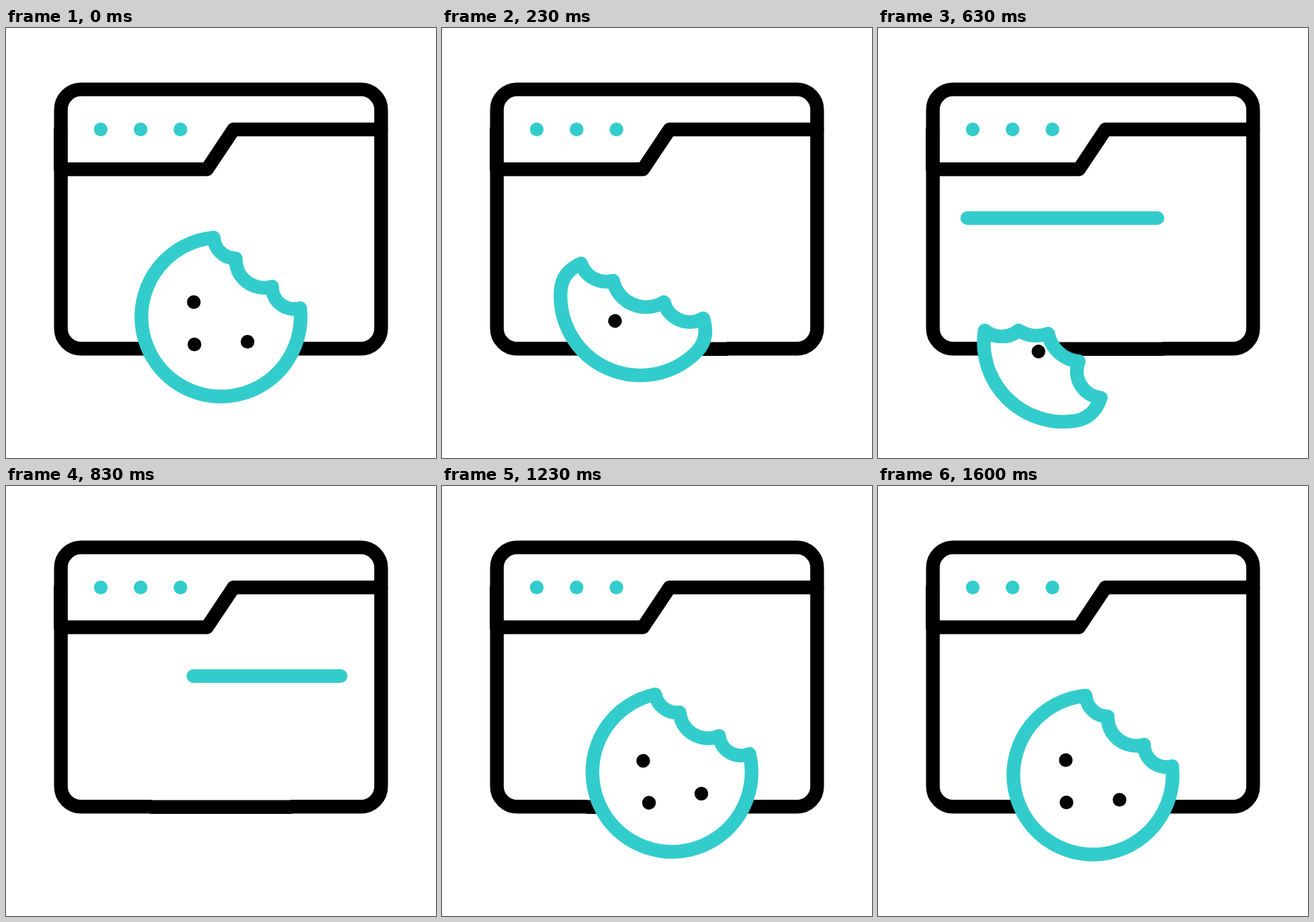
An HTML page for the animation above (1670 ms loop, 640 px wide and 640 px high).

```html
<!DOCTYPE html>
<html lang="en">
<head>
<meta charset="utf-8">
<title>Cookie</title>
<style>
  html, body { margin: 0; width: 100%; height: 100%; overflow: hidden; background: #fff; }
  svg { display: block; width: 100vw; height: 100vh; }
  .line { fill: none; stroke: #000; stroke-width: 20.4; stroke-linecap: round; stroke-linejoin: round; }
  .teal { stroke: #3cc; }
  .tealFill { fill: #3cc; }
</style>
</head>
<body>
<svg viewBox="0 0 640 640">
  <defs>
    <clipPath id="inside"><path id="clip"/></clipPath>
    <circle id="dot" r="10.2"/>
  </defs>
  <path class="line" d="M215.5 477.2H111.7a30 30 0 0 1-30-30V121.4a30 30 0 0 1 30-30H528.3a30 30 0 0 1 30 30V447.2a30 30 0 0 1-30 30H425M215.5 477.7H425"/>
  <path class="line" d="M558.3 151H338.7L299.2 210.2H81.3V151"/>
  <g class="tealFill">
    <use href="#dot" x="141" y="151"/>
    <use href="#dot" x="200.3" y="151"/>
    <use href="#dot" x="259.6" y="151"/>
  </g>
  <path id="bar" class="line teal"/>
  <g id="cookie">
    <path id="dough" fill="#fff"/>
    <g clip-path="url(#inside)">
      <g id="chips">
        <use href="#dot" x="-40.5" y="-22"/>
        <use href="#dot" x="-39.5" y="41"/>
        <use href="#dot" x="39.5" y="37"/>
      </g>
    </g>
    <path id="rim" class="line teal"/>
  </g>
</svg>
<script>
const LOOP = 1670, STEP = 1000 / 30, LAST = 48, R = 118.5;
const el = id => document.getElementById(id);
const ramp = (n, a, b) => Math.min(1, Math.max(0, (n - a) / (b - a)));
const ease = (n, a, b) => { const u = ramp(n, a, b); return u * u * (3 - 2 * u); };
const mix = (p, q, u) => p.map((v, i) => v + (q[i] - v) * u);

// Tooth marks from the upper end of the rim to the right end
const corners = [[-10.9, -118], [22, -87], [28.1, -63.2], [76, -45], [117.8, -13]];
const radii = [33, 43, 43, 33];
const leftBite = [[-115.3, 26.4], [-68.5, 8.2]];

// An end of the bite that lies inside the circle is joined to the rim by a rounded corner.
function rimEnd([x, y], side) {
  const depth = Math.max(0, R - Math.hypot(x, y));
  const a = Math.atan2(y, x) + side * depth * 0.024;
  const px = R * Math.cos(a), py = R * Math.sin(a), len = side * depth * 1.55;
  return { a, at: `${px} ${py}`, bend: `${px + Math.sin(a) * len} ${py - Math.cos(a) * len}` };
}

function outline(deep, left) {
  const grow = 1 + 0.2 * deep;
  const pts = corners.map(([x, y], i) => {
    const p = [x * grow - 59.5 * deep, y * grow + 72.4 * deep];
    return leftBite[i] ? mix(p, leftBite[i], left) : p;
  });
  const start = rimEnd(pts[4], 1), end = rimEnd(pts[0], -1);
  const turn = (end.a - start.a + 4 * Math.PI) % (2 * Math.PI);
  const teeth = radii.map((r, i) => `A${r * grow} ${r * grow} 0 0 0 ${pts[i + 1]}`).join('');
  return `M${pts[0]}${teeth}Q${start.bend} ${start.at}` +
    `A${R} ${R} 0 ${turn > Math.PI ? 1 : 0} 1 ${end.at}Q${end.bend} ${pts[0]}Z`;
}

// Hop up, fall and shrink away while being eaten
function leaving(n) {
  const rise = ease(n, 0, 11), fall = ease(n, 11, 20);
  return {
    x: 320 - 35.8 * rise - 8.5 * fall,
    y: 430 - 45 * rise + 85.5 * fall,
    tilt: -21.5 * rise + 44.4 * fall,
    size: 1 - ease(n, 20, 24),
    deep: ease(n, 2, 6),
    left: ease(n, 9, 13)
  };
}

// Pop in, drop below the resting place and settle
function arriving(n) {
  const grow = ease(n, 28, 34), drop = ease(n, 34, 40.5), settle = ease(n, 40.5, 48);
  return {
    x: 363.2 - 47.2 * drop + 4 * settle,
    y: 394.4 + 71.3 * drop - 35.7 * settle,
    tilt: -30 + 17.5 * grow + 12.5 * drop,
    size: grow,
    deep: 0,
    left: 0
  };
}

function drawCookie(n) {
  const c = n < 26 ? leaving(n) : arriving(n);
  const d = outline(c.deep, c.left);
  el('cookie').style.display = c.size > 0 ? '' : 'none';
  el('cookie').setAttribute('transform', `translate(${c.x} ${c.y}) rotate(${c.tilt}) scale(${c.size})`);
  for (const id of ['dough', 'clip', 'rim']) el(id).setAttribute('d', d);
  el('chips').setAttribute('transform', `translate(${16.4 * c.left - 6.4 * c.deep} ${-14.5 * c.deep})`);
}

function drawBar(n) {
  const tail = 133 + 365 * ramp(n, 19.67, 33), head = 133 + 365 * ramp(n, 8.67, 22);
  el('bar').setAttribute('d', head > tail ? `M${tail} 282.9H${head}` : '');
}

function draw() {
  const t = performance.now() % LOOP;
  const n = Math.min(LAST, Math.floor((t + 4) / STEP));
  drawBar(n);
  drawCookie(n);
  requestAnimationFrame(draw);
}
draw();
</script>
</body>
</html>
```
